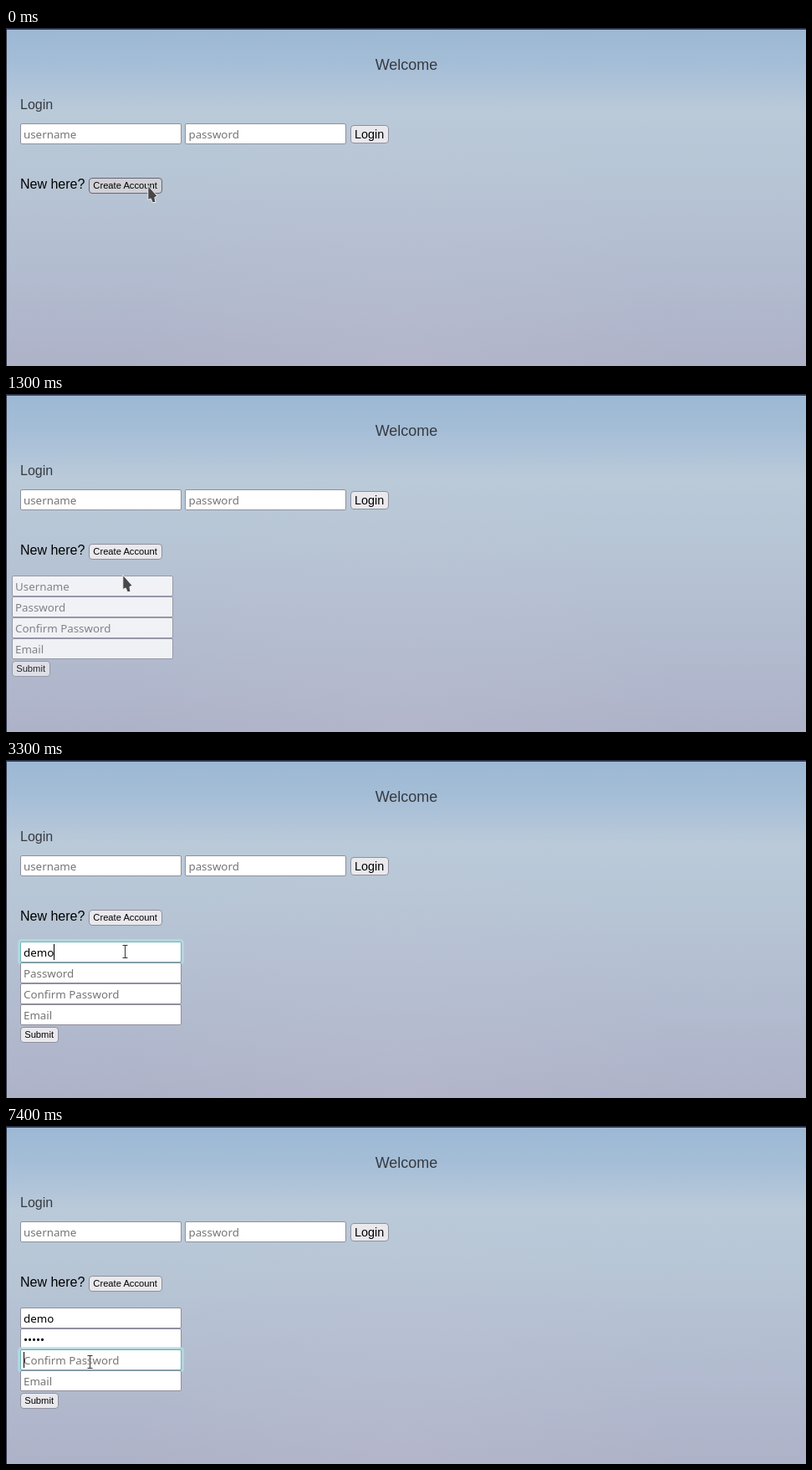
An HTML page for the animation above (8000 ms loop, 957 by 404 pixels).

```html
<!DOCTYPE html>
<html lang="en">
<head>
<meta charset="utf-8">
<title>Sign-up form</title>
<style>
  html, body { margin: 0; width: 100%; height: 100%; overflow: hidden; }
  body {
    background:
      radial-gradient(ellipse 330px 350px at 475px 404px, rgba(200, 196, 213, .2), rgba(200, 196, 213, 0)),
      linear-gradient(#9cb8d4, #a4bdd7 10%, #bacad9 25%, #b6c4d4 48%, #b2bbcf 74%, #aeb2c8);
  }
  svg { display: block; width: 957px; height: 404px; }
  text { font-family: "Liberation Sans", Arial, sans-serif; white-space: pre; }
  .title { fill: #373a3f; }
  .field text { font: 13.333px "Noto Sans", "Open Sans", sans-serif; }
  .field .box { fill: #fff; stroke: #8f8f9d; }
  .field .glow { fill: none; stroke: #b0dfe5; stroke-width: 3; opacity: 0; filter: blur(.6px); }
  .field.hover .box { stroke: #676774; }
  .field.focus .box { stroke: #70b3b4; }
  .field.focus .glow { opacity: .75; }
  .field .hint { fill: #757575; }
  .button rect { fill: #e9e9ed; stroke: #8f8f9d; }
  .button.hover rect { fill: #d0d0d7; stroke: #676774; }
  .button.active rect { fill: #b1b1b9; stroke: #484851; }
</style>
</head>
<body>
<svg viewBox="0 0 957 404">
  <g id="page">
    <text class="title" x="479" y="50" font-size="18" text-anchor="middle">Welcome</text>
    <text class="title" x="17" y="97" font-size="16">Login</text>
    <text x="17" y="192" font-size="16">New here?</text>
  </g>
  <g id="form"></g>
  <rect id="caret" width="1" height="19"/>
  <path d="M0 1H957" stroke="#2f364c" stroke-width="2"/>
  <path d="M.5 0V404" stroke="#2f364c"/>
  <path id="arrow" d="M.8 .8V18L4.2 16.4L6.2 21H10L8.9 15L12 13.4Z"
        fill="#474749" stroke="#f2f2f4" stroke-linejoin="round"/>
  <g id="beam" fill="none">
    <path d="M-2.5 -7.5H3.5M.5 -7.5V7.5M-2.5 7.5H3.5" stroke="#fff" stroke-width="2.4" opacity=".65"/>
    <path d="M-2.5 -7.5H3.5M.5 -7.5V7.5M-2.5 7.5H3.5" stroke="#333"/>
  </g>
</svg>
<script>
const LOOP = 8000, STEP = 100;
const $ = id => document.getElementById(id);

function add(parent, tag, attrs, content = '') {
  const node = document.createElementNS('http://www.w3.org/2000/svg', tag);
  for (const key in attrs) node.setAttribute(key, attrs[key]);
  node.textContent = content;
  return parent.appendChild(node);
}

function addField(parent, x, y, hint) {
  const node = add(parent, 'g', { class: 'field' });
  const left = Math.round(x);
  add(node, 'rect', { class: 'glow', x: left - 1.5, y: y - 1.5, width: 196, height: 28, rx: 3 });
  add(node, 'rect', { class: 'box', x: left + .5, y: y + .5, width: 192, height: 24, rx: 1.5 });
  const text = add(node, 'text', { class: 'hint', x: x + 4, y: y + 18 }, hint);
  return { node, text, hint, x, y };
}

function addButton(parent, x, y, width, height, size, baseline, label) {
  const node = add(parent, 'g', { class: 'button' });
  add(node, 'rect', { x: x + .5, y: y + .5, width: width - 1, height: height - 1, rx: 3.5 });
  add(node, 'text', { x: x + width / 2 - .4, y: baseline, 'font-size': size, 'text-anchor': 'middle' }, label);
  return node;
}

addField($('page'), 17, 114, 'username');
addField($('page'), 214.45, 114, 'password');
addButton($('page'), 412, 116, 46, 22, 14.4, 132, 'Login');
const create = addButton($('page'), 99, 179, 88, 19, 11.2, 192, 'Create Account');

const fields = ['Username', 'Password', 'Confirm Password', 'Email']
  .map((hint, i) => addField($('form'), 17, 217 + 25 * i, hint));
addButton($('form'), 17, 319, 46, 19, 11.2, 332, 'Submit');

const clamp = (v, low, high) => Math.min(high, Math.max(low, v));
const progress = (t, from, to) => clamp((t - from) / (to - from), 0, 1);
const easeOut = k => 1 - (1 - k) ** 2;

// CSS "ease": bisect the curve parameter for the given time share
function ease(k) {
  let low = 0, high = 1;
  for (let i = 0; i < 20; i++) {
    const s = (low + high) / 2, r = 1 - s;
    if (.75 * r * s * (r + s) + s ** 3 < k) low = s; else high = s;
  }
  const r = 1 - low;
  return .3 * r * r * low + 3 * r * low * low + low ** 3;
}

// Pointer moves after the resting point: from, to, x, y
const moves = [
  [100, 300, 169, 186], [400, 500, 169, 187], [1000, 1600, 129, 225],
  [2100, 2400, 142, 229], [4000, 4400, 125, 257], [6700, 7200, 100, 282]
];

function pointerAt(t) {
  let x = 169, y = 188;
  for (const [from, to, nextX, nextY] of moves) {
    const k = easeOut(progress(t, from, to));
    x += (nextX - x) * k;
    y += (nextY - y) * k;
  }
  return [Math.round(x), Math.round(y)];
}

const keysSince = (t, from, count) => clamp(Math.floor((t - from) / STEP) + 1, 0, count);
const within = (t, from, to) => t >= from && t < to;
const place = (node, x, y) => node.setAttribute('transform', `translate(${x} ${y})`);
const show = (node, on) => node.setAttribute('visibility', on ? 'visible' : 'hidden');

function render(t) {
  const [x, y] = pointerAt(t);
  const overForm = y >= fields[0].y;

  const shown = ease(progress(t, 850, 1750));
  place($('form'), Math.round(-50 * (1 - shown)), 0);
  $('form').setAttribute('opacity', shown);

  create.classList.toggle('hover', y < 198);
  create.classList.toggle('active', within(t, 800, 900));

  const focus = t >= 7400 ? 2 : t >= 4400 ? 1 : t >= 1800 ? 0 : -1;
  const nameLength = keysSince(t, 2300, 2) + keysSince(t, 3200, 2);
  const passLength = keysSince(t, 5500, 4) + keysSince(t, 6000, 1);
  const values = ['demo'.slice(0, nameLength), '•'.repeat(passLength)];
  fields.forEach((field, i) => {
    field.node.classList.toggle('focus', i === focus);
    field.node.classList.toggle('hover', within(y, field.y, field.y + 25));
    field.text.textContent = values[i] || field.hint;
    field.text.classList.toggle('hint', !values[i]);
  });

  const blink = within(t, 3000, 3200) || within(t, 4100, 4400) || within(t, 6800, 7400);
  show($('caret'), focus >= 0 && !blink);
  if (focus >= 0) {
    const { text, x: left, y: top } = fields[focus];
    const width = values[focus] ? text.getComputedTextLength() : 0;
    place($('caret'), left + 4 + Math.round(width), top + 3);
  }

  show($('arrow'), !overForm);
  show($('beam'), overForm);
  place(overForm ? $('beam') : $('arrow'), x, overForm ? y : y - .5);
}

function tick() {
  const t = performance.now() % LOOP;
  render(Math.floor(t / STEP) * STEP);
  requestAnimationFrame(tick);
}
tick();
</script>
</body>
</html>
```
